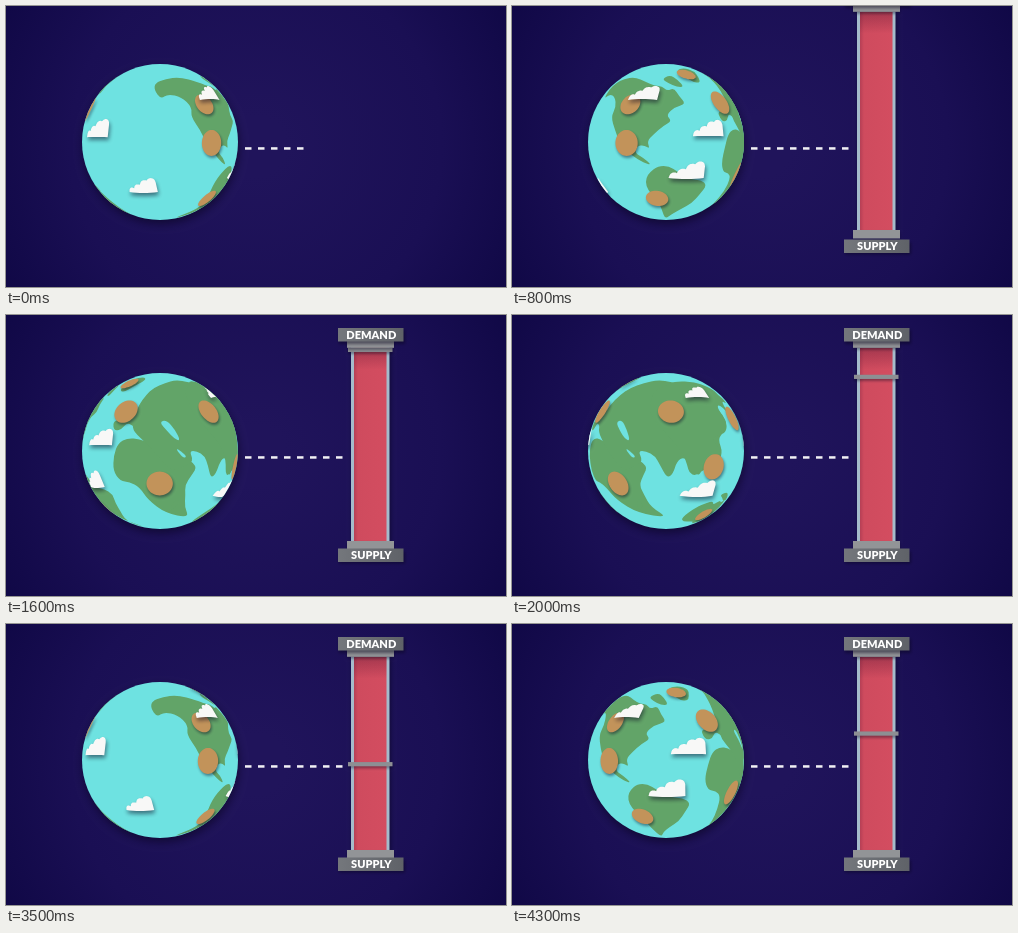
Animation of 500 by 281 pixels, one loop 4.4 s. Source, as an HTML page with a canvas:

```html
<!DOCTYPE html>
<html lang="en">
<head>
<meta charset="utf-8">
<title>Supply and demand</title>
<style>
  html, body { margin: 0; width: 100%; height: 100%; overflow: hidden; background: #180e50; }
  canvas { display: block; width: 500px; height: 281px; }
</style>
</head>
<body>
<canvas id="stage"></canvas>
<script>
const W = 500, H = 281, LOOP = 4400, STEP = 100;
const globe = { x: 154, y: 136, r: 78 };
const canvas = document.getElementById('stage');
const ratio = window.devicePixelRatio || 1;
canvas.width = W * ratio;
canvas.height = H * ratio;
const ctx = canvas.getContext('2d');

const clamp = v => Math.max(0, Math.min(1, v));

// Smooth interpolation through [time, value] stops.
function tween(t, stops) {
  if (t <= stops[0][0]) return stops[0][1];
  for (let i = 1; i < stops.length; i++) {
    const [t0, a] = stops[i - 1], [t1, b] = stops[i];
    if (t < t1) {
      const p = (t - t0) / (t1 - t0);
      return a + (b - a) * p * p * (3 - 2 * p);
    }
  }
  return stops[stops.length - 1][1];
}

// Globe angle in radians: a short run-up, then constant speed.
const spin = t => 0.1077 * (t - 125 * (1 - Math.exp(-t / 200))) * Math.PI / 180;

// Stage position seen at a given time -> [longitude, latitude].
function locate(time, x, y) {
  const lat = Math.asin((globe.y - y) / globe.r);
  const s = (x - globe.x) / (globe.r * Math.cos(lat));
  return [Math.asin(Math.max(-1, Math.min(1, s))) + spin(time), lat];
}

// Points on the far side land outside the disc, where the clip hides them.
function project([lon, lat], turn) {
  const x = Math.cos(lat) * Math.sin(lon - turn);
  const y = -Math.sin(lat);
  const z = Math.cos(lat) * Math.cos(lon - turn);
  const k = z < 0 ? 2 / Math.max(0.05, Math.hypot(x, y)) - 1 : 1;
  return { x: globe.x + globe.r * x * k, y: globe.y + globe.r * y * k, z };
}

// Offset from an anchor along the surface, in pixels east and north.
function offset([lon, lat], east, north) {
  const u = east / globe.r, v = north / globe.r;
  const up = Math.sin(lat) + v * Math.cos(lat);
  const out = Math.cos(lat) - v * Math.sin(lat);
  return [lon + Math.atan2(u, out), Math.atan2(up, Math.hypot(u, out))];
}

function outline(time, text) {
  return text.split(' ').map(p => locate(time, ...p.split(',').map(Number)));
}

const lands = [
  // North America
  outline(800, '92,93 97,84 104,77 112,73 123,71 134,76 143,80 150,80 155,85 162,82 167,90 174,98 163,101 154,109 160,115 151,120 142,128 135,135 138,143 132,139 125,140 123,147 130,151 140,159 132,157 119,149 108,138 103,124 99,111 104,101 103,91 98,88'),
  outline(800, '150,73 158,69 166,74 172,81 165,81 156,77'),
  // Greenland
  outline(800, '164,64 172,62 182,65 187,72 188,77 181,76 173,71'),
  // South America
  outline(800, '138,166 146,160 157,160 166,166 176,173 189,174 195,179 188,188 180,197 169,203 160,208 153,213 150,204 147,197 139,188 134,180 134,172'),
  // Europe
  outline(1200, '159,112 158,106 167,104 170,98 180,94 186,98 192,92 186,88 182,80 186,72 195,74 204,80 213,89 221,104 225,116 214,119 205,120 200,114 194,116 190,110 184,108 188,116 180,110 174,108 170,114 163,116'),
  // Africa
  outline(1200, '163,140 168,128 178,123 190,124 198,128 208,126 217,128 221,140 227,151 223,160 217,170 213,180 205,192 198,203 190,198 186,185 184,172 176,167 166,166 160,156'),
  outline(2000, '125,183 131,188 129,196 125,192'),
  // Asia
  outline(2000, '90,103 98,90 108,80 118,73 132,68 146,65 160,67 172,70 184,75 194,82 202,90 211,100 215,109 211,118 206,124 211,138 204,152 196,150 187,146 190,157 185,161 178,149 172,142 165,146 161,159 155,163 148,150 143,141 134,136 126,136 131,146 122,152 112,156 104,148 96,136 90,125 86,115'),
  outline(2700, '90,85 100,76 112,71 124,66 140,67 150,72 156,76 152,80 159,84 156,89 148,86 143,90 144,98 140,96 136,90 130,91 128,98 131,108 124,118 112,120 106,125 112,132 115,142 110,153 100,154 96,161 91,158 88,150 85,140 81,125 84,100'),
  // Australia and its neighbour
  outline(2700, '118,192 124,188 130,186 136,190 142,185 148,188 154,184 160,192 161,200 156,206 148,209 142,206 132,207 122,203'),
  outline(2700, '134,180 144,177 153,180 160,185 150,186 143,183')
];
const seas = [
  outline(2000, '104,107 110,105 115,115 118,126 113,124 108,116'),
  outline(2000, '113,133 118,136 124,142 120,143')
];

const disc = (time, x, y, r) => Array.from({ length: 24 }, (_, i) => {
  const a = i * Math.PI / 12;
  return offset(locate(time, x, y), r * Math.cos(a), r * Math.sin(a));
});
const coins = [
  disc(800, 114, 137, 13.3), disc(800, 118, 98, 11.5), disc(1200, 168, 96, 13.3),
  disc(1200, 147, 68, 10), disc(800, 145, 193, 11.5), disc(1200, 202, 169, 13.5),
  disc(2000, 159, 96, 13.3), disc(2700, 109, 152, 13.2), disc(2700, 141, 200, 10),
  disc(2700, 149, 103, 13.3)
];

// Cloud profile as overlapping bumps: centre, half width, height.
const bumps = [[-0.36, 0.13, 0.36], [-0.13, 0.16, 0.6], [0.12, 0.17, 0.88], [0.34, 0.16, 1]];
function cloud(time, x, base, width, height) {
  const anchor = locate(time, x, base);
  const points = [];
  for (let i = 0; i <= 48; i++) {
    const u = i / 48 - 0.5;
    const top = Math.max(0, ...bumps.map(([c, half, h]) => {
      const d = Math.abs(u - c) / half;
      return d < 1 ? h - 0.3 + 0.3 * Math.sqrt(1 - d * d) : 0;
    }));
    points.push(offset(anchor, u * width, top * height));
  }
  for (let i = 8; i >= 0; i--) points.push(offset(anchor, (i / 8 - 0.5) * width, 0));
  return points;
}
const clouds = [
  cloud(1200, 142, 130, 38, 17), cloud(4300, 155, 173, 38, 19),
  cloud(800, 130, 93, 32, 18), cloud(2000, 185, 182, 39, 19),
  cloud(2000, 186, 82, 29, 17), cloud(2700, 189, 131, 38, 19),
  cloud(3500, 134, 187, 30, 18)
];

function shadow(alpha, dx, dy, blur) {
  ctx.shadowColor = `rgba(8, 4, 30, ${alpha})`;
  ctx.shadowOffsetX = dx * ratio;
  ctx.shadowOffsetY = dy * ratio;
  ctx.shadowBlur = blur * ratio;
}

function fillShape(shape, turn, color, curved) {
  const pts = shape.map(p => project(p, turn));
  if (pts.every(p => p.z < 0)) return;
  const mid = (a, b) => [(a.x + b.x) / 2, (a.y + b.y) / 2];
  ctx.beginPath();
  if (curved) {
    ctx.moveTo(...mid(pts[pts.length - 1], pts[0]));
    pts.forEach((p, i) => ctx.quadraticCurveTo(p.x, p.y, ...mid(p, pts[(i + 1) % pts.length])));
  } else {
    pts.forEach(p => ctx.lineTo(p.x, p.y));
  }
  ctx.fillStyle = color;
  ctx.fill();
}

function drawBackground() {
  const g = ctx.createRadialGradient(250, 140, 30, 250, 140, 290);
  g.addColorStop(0, '#20145b');
  g.addColorStop(0.6, '#1a0f54');
  g.addColorStop(1, '#100846');
  ctx.fillStyle = g;
  ctx.fillRect(0, 0, W, H);
}

function drawGlobe(t) {
  const turn = spin(t);
  ctx.save();
  ctx.beginPath();
  ctx.arc(globe.x, globe.y, globe.r, 0, 2 * Math.PI);
  shadow(0.6, 1, 4, 8);
  ctx.fillStyle = '#6ee2e1';
  ctx.fill();
  ctx.clip();
  shadow(0, 0, 0, 0);
  lands.forEach(s => fillShape(s, turn, '#62a468', true));
  seas.forEach(s => fillShape(s, turn, '#6ee2e1', true));
  shadow(0.45, 1, 2, 3);
  coins.forEach(s => fillShape(s, turn, '#c2935a', true));
  shadow(0.5, 1, 3, 4);
  clouds.forEach(s => fillShape(s, turn, '#f8f8f7', false));
  ctx.restore();
}

function drawDashes(t) {
  const end = Math.min(337, 297.5 + t * 0.2);
  ctx.fillStyle = '#f1f0f4';
  for (let x = 239; x < end; x += 13) {
    ctx.fillRect(x, 141.2, Math.min(6.5, end - x), 2.5);
  }
}

function box(x, y, w, h, color) {
  ctx.fillStyle = color;
  ctx.fillRect(x, y, w, h);
}

function drawLabel(text, y) {
  const g = ctx.createLinearGradient(332, 0, 397, 0);
  g.addColorStop(0, '#74777c');
  g.addColorStop(1, '#5f6268');
  shadow(0.5, 1, 2, 3);
  box(332, y, 65.5, 13.5, g);
  shadow(0, 0, 0, 0);
  ctx.fillStyle = '#fff';
  ctx.fillText(text, 365.3, y + 10.8);
}

function drawTube(t) {
  const size = tween(t, [[180, 0], [420, 1]]);
  if (!size) return;
  const top = tween(t, [[400, 206], [800, -14], [1200, 13]]);
  const foot = 226 - 2 * clamp((13 - top) / 27);
  const head = top + 19.5;

  ctx.save();
  ctx.translate(365, 247);
  ctx.scale(size, size);
  ctx.translate(-365, -247);
  ctx.font = '900 11px Lato, "Open Sans", sans-serif';
  ctx.textAlign = 'center';

  if (foot > head) {
    shadow(0.5, 1, 2, 4);
    box(345, head, 38.5, foot - head, '#a5bccb');
    shadow(0, 0, 0, 0);
    const red = ctx.createLinearGradient(348, 0, 381, 0);
    red.addColorStop(0, '#b53f55');
    red.addColorStop(0.12, '#cf4b5e');
    red.addColorStop(1, '#d34d60');
    box(348, head, 32.5, foot - head, red);
    const shade = ctx.createLinearGradient(0, head, 0, head + 22);
    shade.addColorStop(0, 'rgba(80, 15, 45, .35)');
    shade.addColorStop(1, 'rgba(80, 15, 45, 0)');
    box(348, head, 32.5, Math.min(22, foot - head), shade);
  }

  if (t > 1350) {
    const level = tween(t, [[1350, 29], [3200, 144.5], [4700, 102]]);
    shadow(0.4, 0, 2, 3);
    box(342, level - 2, 44.5, 4.2, '#8d8f93');
  }

  shadow(0.4, 0, 2, 3);
  box(341, foot, 47, 8.5, '#929497');
  box(341, top + 13, 47, 6.8, '#929497');
  drawLabel('SUPPLY', 233.5);
  drawLabel('DEMAND', top);
  ctx.restore();
}

function draw(now) {
  const t = Math.floor(now % LOOP / STEP) * STEP;
  ctx.setTransform(ratio, 0, 0, ratio, 0, 0);
  drawBackground();
  drawGlobe(t);
  drawDashes(t);
  drawTube(t);
  requestAnimationFrame(draw);
}
draw(0);
</script>
</body>
</html>
```
